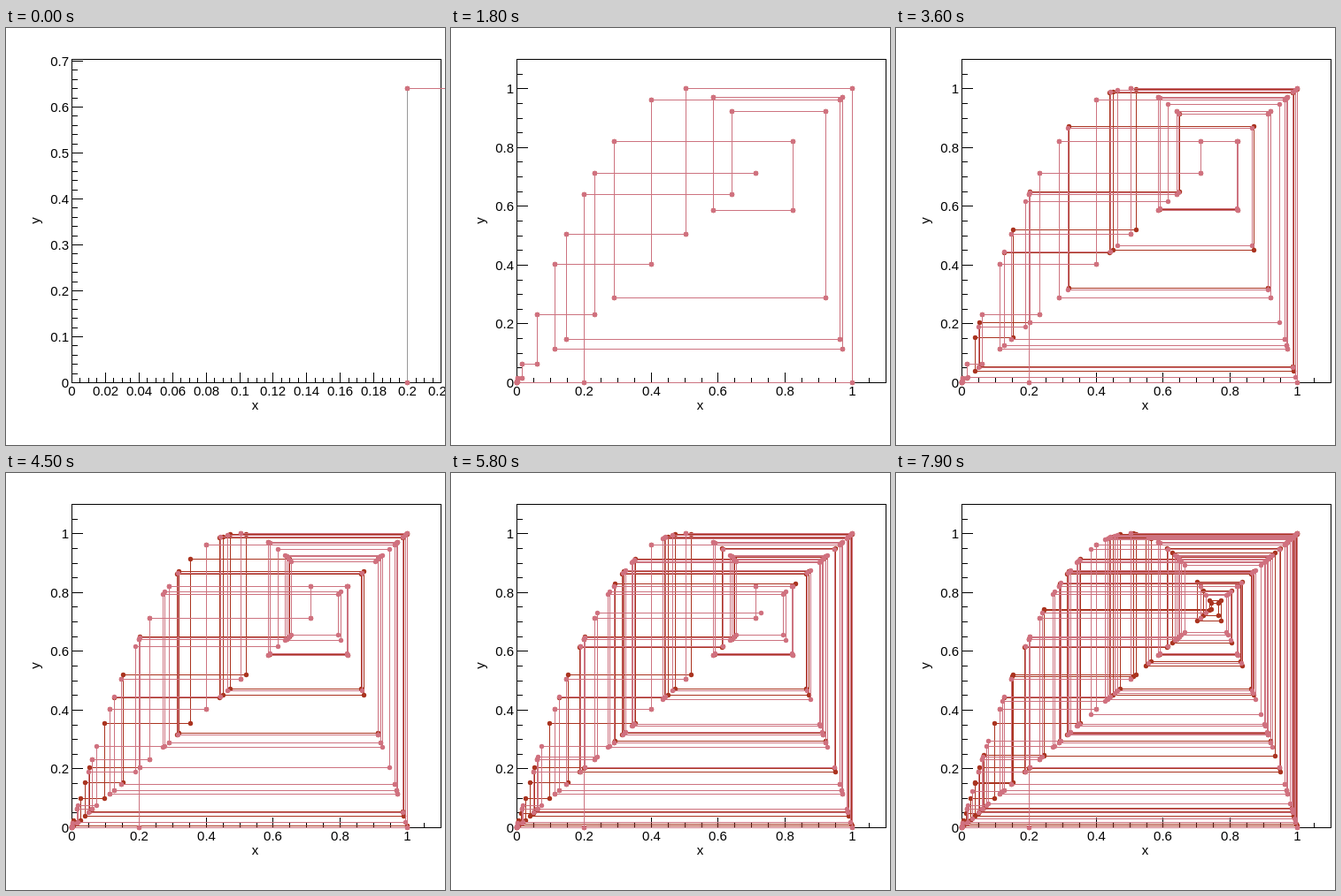
Animation of 496x472 px, one loop 8 s. Source, as an HTML page:

```html
<!DOCTYPE html>
<html lang="en">
<head>
<meta charset="utf-8">
<title>Logistic map cobweb</title>
<style>
  html, body { margin: 0; width: 100%; height: 100%; overflow: hidden; background: #fff; }
  svg { display: block; width: 496px; height: 472px; }
  text { font: 15px "Liberation Sans", Arial, sans-serif; text-anchor: middle; }
  .y text { text-anchor: end; }
  polyline, path { fill: none; shape-rendering: crispEdges; }
  path { stroke: #000; }
  #a { stroke: #aa3420; marker: url(#dotA); }
  #b { stroke: #cd7380; marker: url(#dotB); }
  .first #b { stroke: #999; }
</style>
</head>
<body>
<svg viewBox="0 0 496 472">
  <defs>
    <marker id="dotA" markerUnits="userSpaceOnUse" markerWidth="8" markerHeight="8" refX="4" refY="4">
      <circle cx="4" cy="4" r="2.7" fill="#aa3420"/>
    </marker>
    <marker id="dotB" markerUnits="userSpaceOnUse" markerWidth="8" markerHeight="8" refX="4" refY="4">
      <circle cx="4" cy="4" r="2.7" fill="#d0717f"/>
    </marker>
  </defs>
  <path d="M74.5 35.5H491.5V401.5H74.5Z"/>
  <path id="ticks"/>
  <g class="x" id="xLabels"></g>
  <g class="y" id="yLabels"></g>
  <text x="281.5" y="431.5">x</text>
  <text transform="translate(38 218) rotate(-90)">y</text>
  <g id="web">
    <polyline id="a"/>
    <polyline id="b"/>
    <path id="lead" style="stroke:#cd7380"/>
  </g>
</svg>
<script>
const STEPS = 80, STEP_MS = 100;
const LEFT = 74, BOTTOM = 401, WIDTH = 417, HEIGHT = 366;
const $ = id => document.getElementById(id);

function orbit(x) {
  const xs = [x];
  for (let i = 0; i < STEPS; i++) xs.push(x = 4 * x * (1 - x));
  return xs;
}
const first = orbit(0.2), second = orbit(0.2000000001);

const px = (v, max) => Math.round(LEFT + v / max * WIDTH) + 0.5;
const py = (v, max) => Math.round(BOTTOM - v / max * HEIGHT) + 0.5;

// major step and number of minor intervals within it
function division(max) {
  if (max < 0.3) return [0.02, 4];
  return max < 1 ? [0.1, 5] : [0.2, 4];
}

function axis(max, tick, label) {
  const [major, parts] = division(max);
  let marks = "", labels = "";
  for (let i = 0; i * major / parts <= max + 1e-9; i++) {
    const v = i * major / parts, isMajor = i % parts === 0;
    marks += tick(v, isMajor ? 12 : 6);
    if (isMajor) labels += label(v, +v.toFixed(2));
  }
  return [marks, labels];
}

function points(xs, k, xMax, yMax) {
  const out = [];
  const add = (x, y) => out.push(px(x, xMax) + "," + py(y, yMax));
  add(xs[0], 0);
  for (let i = 0; i <= k; i++) {
    add(xs[i], xs[i + 1]);
    add(xs[i + 1], xs[i + 1]);
  }
  return out.join(" ");
}

function draw(k) {
  const xMax = 1.1 * Math.max(...first.slice(0, k + 1));
  const yMax = 1.1 * Math.max(...first.slice(1, k + 2));
  const [xMarks, xText] = axis(xMax,
    (v, len) => `M${px(v, xMax)} 401.5v${-len}`,
    (v, s) => `<text x="${px(v, xMax)}" y="416">${s}</text>`);
  const [yMarks, yText] = axis(yMax,
    (v, len) => `M74.5 ${py(v, yMax)}h${len}`,
    (v, s) => `<text x="71" y="${py(v, yMax) + 5}">${s}</text>`);
  $("ticks").setAttribute("d", xMarks + yMarks);
  $("xLabels").innerHTML = xText;
  $("yLabels").innerHTML = yText;
  $("a").setAttribute("points", points(first, k, xMax, yMax));
  $("b").setAttribute("points", points(second, k, xMax, yMax));
  $("web").setAttribute("class", k ? "" : "first");
  $("lead").setAttribute("d", k ? "" : `M${px(0.2, xMax)} ${py(0.64, yMax)}H496`);
}

let shown = -1;
function loop() {
  const k = Math.floor(performance.now() / STEP_MS) % STEPS;
  if (k !== shown) draw(shown = k);
  requestAnimationFrame(loop);
}
loop();
</script>
</body>
</html>
```
